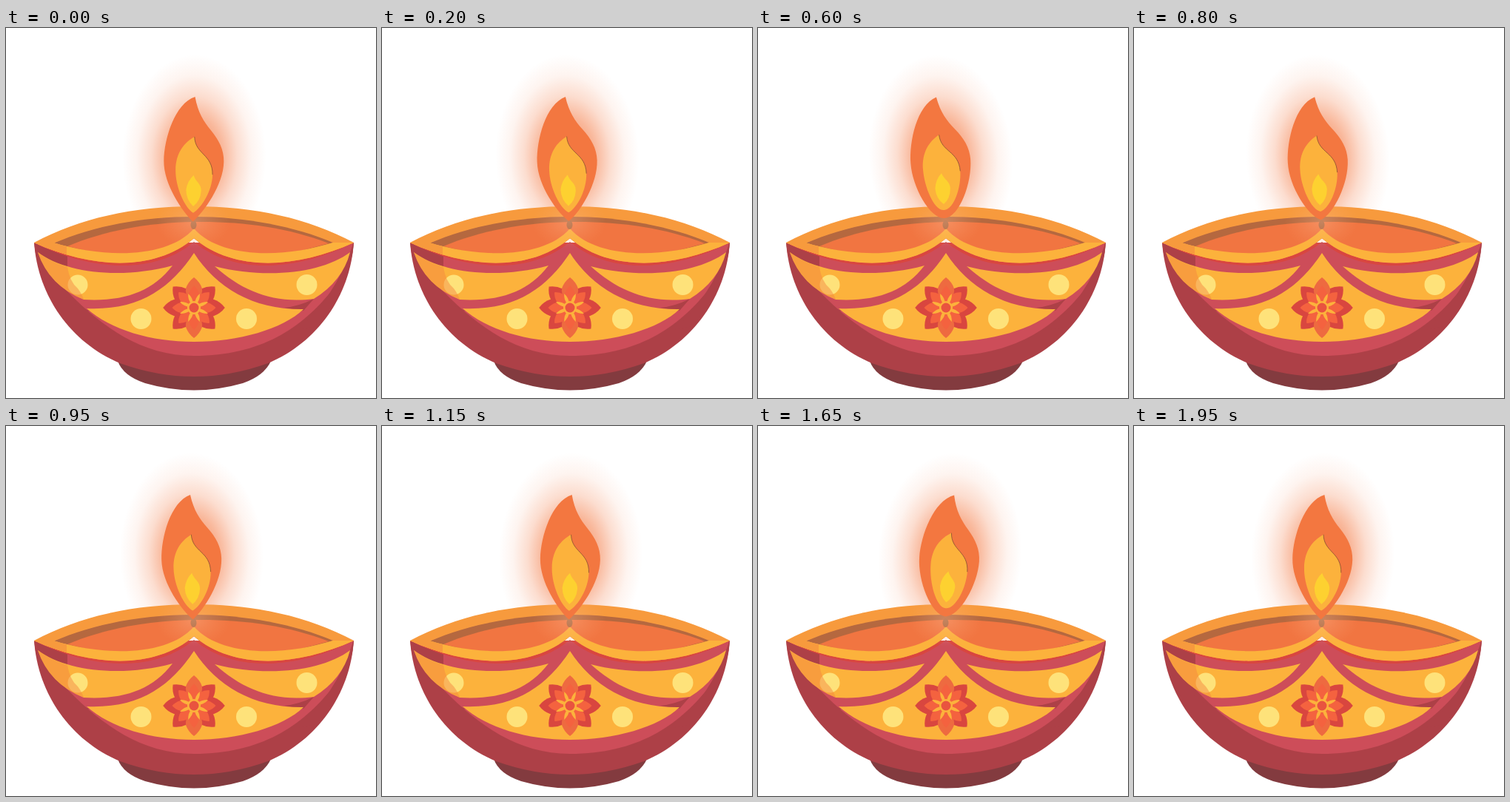
These frames come from a looping animation (500x500 px, 2 s). An HTML page:

```html
<!DOCTYPE html>
<html>
<head>
<meta charset="utf-8">
<style>
html, body { margin: 0; width: 100%; height: 100%; overflow: hidden; background: #fff; }
svg { display: block; width: 100vw; height: 100vh; }
</style>
</head>
<body>
<svg viewBox="0 0 500 500">
  <defs>
    <radialGradient id="glow">
      <stop offset="0" stop-color="#f37740" stop-opacity=".9"/>
      <stop offset=".4" stop-color="#f37740" stop-opacity=".52"/>
      <stop offset=".6" stop-color="#f37740" stop-opacity=".25"/>
      <stop offset=".8" stop-color="#f37740" stop-opacity=".08"/>
      <stop offset="1" stop-color="#f37740" stop-opacity="0"/>
    </radialGradient>
    <radialGradient id="haze">
      <stop offset="0" stop-color="#ffc8a4" stop-opacity=".32"/>
      <stop offset="1" stop-color="#ffb080" stop-opacity="0"/>
    </radialGradient>
    <clipPath id="mouth">
      <path d="M38 290C100 257 172 241 254 241S408 257 470 290C393 325 308 330 254 284C200 330 115 325 38 290Z"/>
    </clipPath>
    <path id="petal" d="M0 0C-6-8-12-17-11-26Q-8-35 0-41Q8-35 11-26C12-17 6-8 0 0Z"/>
  </defs>

  <g class="sway"><ellipse cx="254" cy="175" rx="97" ry="139" fill="url(#glow)"/></g>

  <!-- foot and body -->
  <path fill="#833b3f" d="M151 450Q158 470 188 480Q254 499 320 480Q349 470 358 450Z"/>
  <path fill="#ad4047" d="M38 290C43 362 87 425 154 453Q254 489 354 453C421 425 465 362 470 290Z"/>
  <path fill="#cd4d59" d="M38 290Q48 325 84 357C130 404 184 443 254 443C345 443 400 405 440 355Q462 320 469 291Z"/>
  <path fill="#ad4047" d="M38 290Q44 350 90 403L112 382Q62 362 43 303ZM470 290Q466 345 420 403L395 408Q444 362 465 303ZM376 378Q396 376 416 366L402 382Z"/>
  <path fill="#ad4047" d="M38 290Q60 302 83 306V324Q60 317 43 303Z"/>

  <!-- yellow panels -->
  <g fill="#fcb23c">
    <path d="M43 303C80 331 155 340 225 321C198 356 160 370 105 367Q58 348 43 303Z"/>
    <path d="M465 303C428 331 353 340 282 322C320 356 362 373 416 366Q455 342 465 303Z"/>
    <path d="M254 304C285 352 335 381 402 380C374 407 314 424 254 424C196 424 142 408 109 379C180 382 222 352 254 304Z"/>
  </g>
  <g fill="#fee27a">
    <circle cx="97" cy="347" r="13.5"/><circle cx="182.500" cy="393" r="14"/>
    <circle cx="325" cy="393" r="14"/><circle cx="406.500" cy="347" r="14"/>
  </g>
  <path fill="#f58a40" fill-opacity=".5" d="M43 303Q60 316 83 323Q86 343 97 352Q103 360 105 367Q58 348 43 303Z"/>

  <!-- rim, oil and lip -->
  <path fill="#d9463f" d="M38 290C115 329 200 334 254 289C308 334 393 329 470 290Z"/>
  <g clip-path="url(#mouth)">
    <path fill="#f79a3d" d="M38 240H470V330H38Z"/>
    <path fill="#b5683f" d="M64 291C120 267 185 255 254 255S390 268 442 290L380 306H130Z"/>
    <path fill="#f17541" d="M83 295C132 274 192 263 254 262S380 269 436 291L380 306H130Z"/>
    <path fill="#fcb23c" d="M38 290L64 290C132 311 218 312 254 271C290 312 376 311 442 290L470 290V330H38Z"/>
    <path fill="#f79a3d" d="M38 290L64 290Q73 293 82 295V312L38 300Z"/>
  </g>
  <ellipse cx="253.500" cy="266" rx="4" ry="6" fill="#a9653f"/>

  <g id="flower" transform="translate(254 378)"></g>

  <g class="sway">
    <ellipse cx="254" cy="262" rx="50" ry="36" fill="url(#haze)"/>
    <path id="outer" fill="#f37740"/>
    <path id="inner" fill="#fcb23c"/>
    <path id="edge" fill="none" stroke="#8a5032" stroke-width=".8"/>
    <path id="core" fill="#fdd130"/>
  </g>
</svg>
<script>
const el = id => document.getElementById(id);
const draw = (id, d) => el(id).setAttribute('d', d);

function petals(count, start, scale, color) {
  let out = '';
  for (let i = 0; i < count; i++)
    out += `<use href="#petal" fill="${color}" transform="rotate(${start + i * 360 / count}) scale(${scale})"/>`;
  return out;
}
el('flower').innerHTML =
  petals(4, 45, '.98', '#d9463f') + petals(2, 90, 1.02, '#d9463f') + petals(2, 0, 1, '#ee6a40') +
  petals(8, 0, '.62 .72', '#f4623f') + petals(8, 22.5, '.2 .5', '#fcb23c') +
  '<circle r="9" fill="#fcb23c"/><circle r="6.500" fill="#e9533f"/>';

function pose(time) {
  const s = Math.sin((time - 60) / 1000 * Math.PI);
  const lift = s * s;   // the base rounds off and rises at both ends of the swing
  for (const g of document.querySelectorAll('.sway'))
    g.setAttribute('transform', `translate(-.8) rotate(${-4.2 * s} 253.5 262)`);

  const foot = 262 - 5 * lift, bend = foot - 14 * (1 - lift), wide = 14 + 6 * lift;
  draw('outer', `M254 93C258 114 266 126 276 138C287 151 294 164 294 180
    C294 212 ${253.5 + wide} ${bend} 253.5 ${foot}
    C${253.5 - wide} ${bend} 213 212 213 180C213 150 227 102 254 93Z`);

  const top = 147 - 3 * lift, base = 250 - 4 * lift;
  const dip = base - 7 * (1 - lift), reach = 11 + 3 * lift;
  const side = `M254 ${top}C255 ${top + 24} 279 ${top + 23} 279 ${top + 51}`;
  draw('inner', `${side}C279 ${base - 30} ${253.5 + reach} ${dip} 253.5 ${base}
    C${253.5 - reach} ${dip} 229 ${base - 34} 229 ${top + 45}C229 ${top + 22} 240 ${top + 8} 254 ${top}Z`);
  draw('edge', side);

  const y = 199 - 3 * lift;
  draw('core', `M253.500 ${y}C257 ${y + 10} 264 ${y + 11} 264 ${y + 21}Q263 ${y + 35} 253.500 ${y + 42}
    Q244 ${y + 34} 243.500 ${y + 20}Q245 ${y + 8} 253.500 ${y}Z`);
}

const start = performance.now();
function tick() {
  const time = (performance.now() - start) % 2000;
  pose(Math.floor(time / 50) * 50);
  requestAnimationFrame(tick);
}
tick();
</script>
</body>
</html>
```
